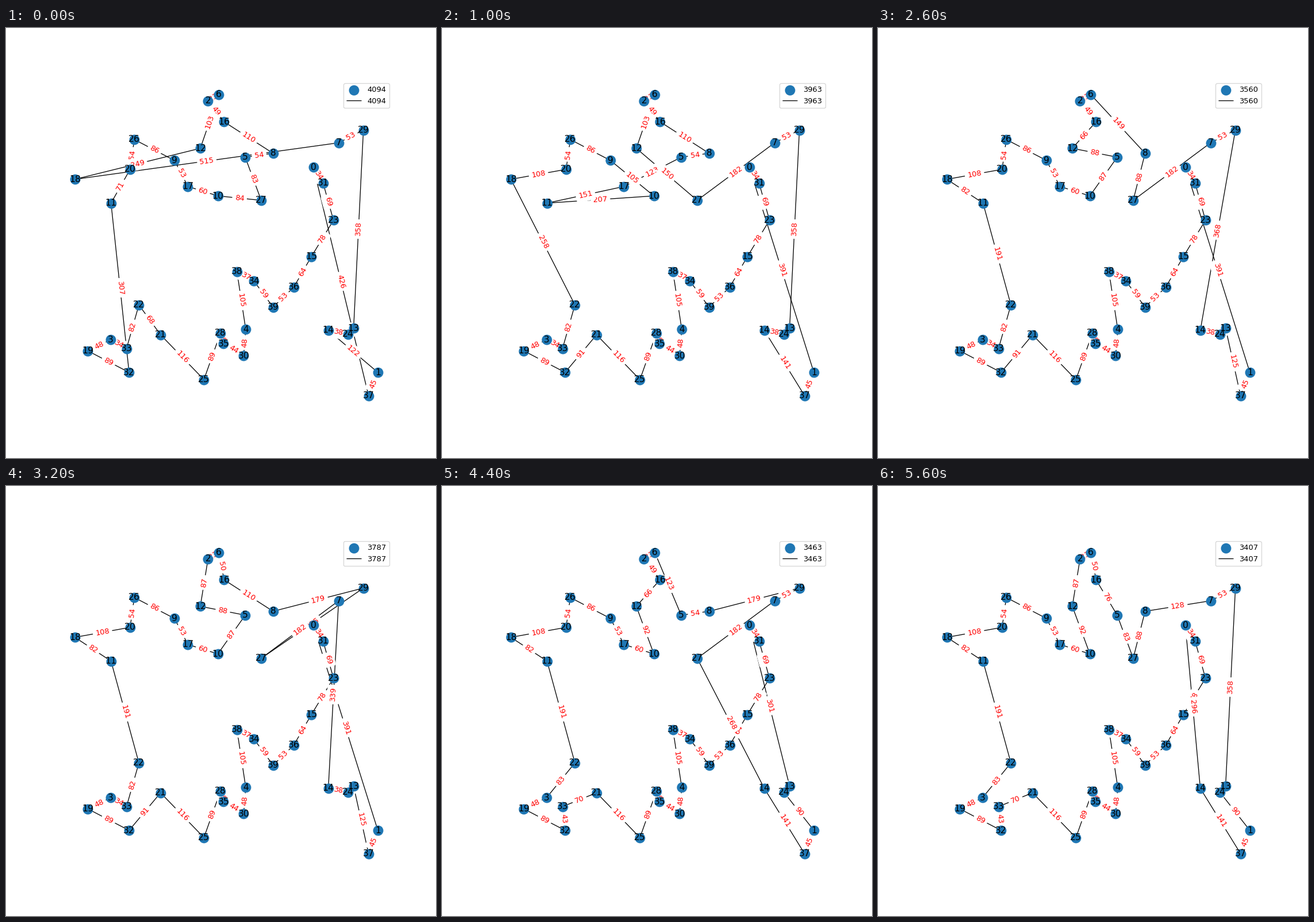
Animation of 748 by 748 pixels, one loop 7.8 s. Source, as a matplotlib script:

```python
import math

import matplotlib.pyplot as plt
from matplotlib.animation import FuncAnimation
from matplotlib.collections import LineCollection

STEP_MS = 200
FRAMES = 39
WIDTH, HEIGHT = 587, 544

CITIES = [
    (462, 131), (587, 502), (258, 11), (69, 443), (331, 424),
    (330, 113), (279, 0), (511, 87), (384, 106), (193, 119),
    (277, 183), (70, 196), (243, 97), (540, 422), (491, 426),
    (458, 293), (289, 49), (219, 166), (0, 153), (25, 463),
    (107, 135), (166, 434), (124, 380), (501, 227), (529, 433),
    (250, 515), (115, 81), (361, 191), (282, 431), (559, 64),
    (327, 472), (481, 160), (105, 502), (100, 459), (347, 337),
    (288, 450), (424, 348), (569, 544), (314, 320), (384, 384),
]

# Moves made at each step: (after, city) or (after, first, last)
STEPS = [
    [(14, 37)], [(21, 32, 22)], [(9, 10)], [(22, 18), (10, 11)], [(12, 27)],
    [(18, 11)], [(17, 26)], [(29, 14)], [(14, 24)],
    [(22, 11)], [(20, 26)], [(9, 17)], [(5, 12), (6, 8)],
    [(12, 2)], [(2, 6)], [(8, 29)], [(29, 7)], [(14, 37)], [(37, 1)],
    [(21, 33)], [(12, 16)], [(6, 5)],
    [(6, 16)], [(5, 27)], [(8, 7)], [(29, 13, 24)], [(24, 1)], [(1, 37)],
]


def gap(a, b):
    return math.dist(CITIES[a], CITIES[b])


def legs(tour):
    return list(zip(tour, tour[1:] + tour[:1]))


def length(tour):
    return sum(int(gap(a, b)) for a, b in legs(tour))


def nearest_tour():
    """Always go on to the closest city not yet visited."""
    tour, left = [0], set(range(1, len(CITIES)))
    while left:
        tour.append(min(left, key=lambda c: gap(tour[-1], c)))
        left.remove(tour[-1])
    return tour


def move(tour, after, first, last=None):
    """Put a run of cities behind another one, reading first to last."""
    i, j = sorted(tour.index(c) for c in (first, first if last is None
                                          else last))
    run, rest = tour[i:j + 1], tour[:i] + tour[j + 1:]
    if run[0] != first:
        run.reverse()
    k = rest.index(after) + 1
    return rest[:k] + run + rest[k:]


tours = [nearest_tour()]
for step in STEPS:
    tour = tours[-1]
    for change in step:
        tour = move(tour, *change)
    tours.append(tour)

fig, ax = plt.subplots(figsize=(8, 8), dpi=93.5)
WHITE_BOX = dict(boxstyle="round", ec="white", fc="white")


def leg_label(a, b):
    (xa, ya), (xb, yb) = CITIES[a], CITIES[b]
    (pa, qa), (pb, qb) = ax.transData.transform([CITIES[a], CITIES[b]])
    angle = math.degrees(math.atan2(qb - qa, pb - pa))
    if angle > 90:
        angle -= 180
    elif angle < -90:
        angle += 180
    ax.text((xa + xb) / 2, (ya + yb) / 2, str(int(gap(a, b))), size=10,
            color="red", ha="center", va="center", rotation=angle,
            bbox=WHITE_BOX, zorder=1, clip_on=True)


def draw(frame):
    tour = tours[min(frame, len(tours) - 1)]
    total = str(length(tour))
    ax.clear()
    ax.set_axis_off()
    ax.set_xlim(-0.05 * WIDTH, 1.05 * WIDTH)
    ax.set_ylim(1.05 * HEIGHT, -0.05 * HEIGHT)

    ax.scatter(*zip(*CITIES), s=150, c="#1f77b4", linewidths=1.5, zorder=2,
               label=total)
    lines = [(CITIES[a], CITIES[b]) for a, b in legs(tour)]
    ax.add_collection(LineCollection(lines, colors="black", linewidths=1,
                                     zorder=1, label=total), autolim=False)
    for a, b in legs(tour):
        leg_label(a, b)
    for n, (x, y) in enumerate(CITIES):
        ax.text(x, y, str(n), size=12, ha="center", va="center", zorder=3,
                clip_on=True)
    ax.legend(loc="upper right")
    return []


anim = FuncAnimation(fig, draw, frames=FRAMES, interval=STEP_MS,
                     init_func=lambda: [], repeat=True, repeat_delay=0)
plt.show()
```
